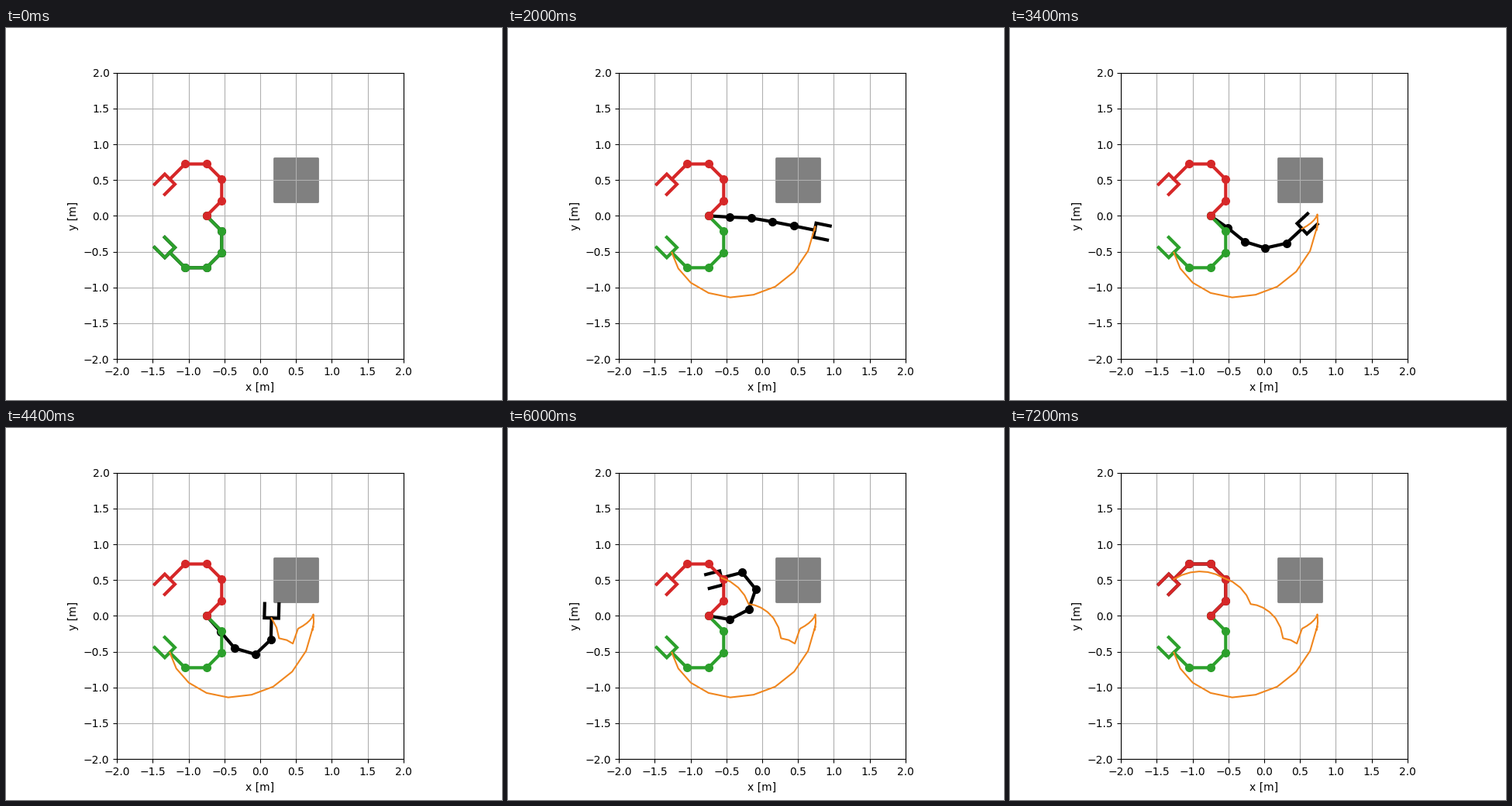
A matplotlib script for the animation above (7.4 s loop, 640 by 480 pixels).

```python
import numpy as np
import matplotlib.pyplot as plt
from matplotlib.animation import FuncAnimation

FRAMES, STEP_MS = 37, 200
BASE = np.array([-0.75, 0.0])
LINK, GRIP = 0.3, 0.1

# The arm uncurls from START and curls the other way to GOAL.
START = -45 * np.arange(1, 6)
GOAL = -START

# Link headings in degrees at the turning points of the motion, by step.
KEYS = {
    0: START,
    5: (-17, -36.5, -57, -84, -108),
    9: (-2, -1, -7, -9, -9.5),
    10: (-3.3, -2.5, -10, -11, -11.5),
    12: (-6, -5, 2, 4, 9),
    17: (-35, -39, -17, 12.5, 43),
    18: (-48, -50, -29, 10, 32),
    20: (-54, -57, -25, 5, 70),
    22: (-48.4, -49.4, -16.5, 43.5, 88.5),
    26: (-44, -29, 14, 80, 150),
    30: (-9.6, 27.5, 71, 129, 194.5),
    FRAMES - 1: GOAL,
}


def pose(step):
    """Link headings in radians, blended evenly between the key poses."""
    steps = list(KEYS)
    return np.radians([np.interp(step, steps, link) for link in zip(*KEYS.values())])


def joints(heading):
    """Points from the base to the hand."""
    links = LINK * np.column_stack([np.cos(heading), np.sin(heading)])
    return np.vstack([BASE, BASE + np.cumsum(links, axis=0)])


def gripper(hand, angle):
    along = np.array([np.cos(angle), np.sin(angle)])
    side = GRIP * np.array([-along[1], along[0]])
    left, right = hand + side, hand - side
    prong = 2 * GRIP * along
    return np.array([left + prong, left, right, right + prong])


class Arm:
    def __init__(self, ax, color):
        style = dict(color=color, lw=3, solid_capstyle="projecting")
        self.links, = ax.plot([], [], **style)
        self.dots, = ax.plot([], [], "o", color=color, ms=7)
        self.grip, = ax.plot([], [], solid_joinstyle="miter", **style)

    def set(self, heading):
        pts = joints(heading)
        self.links.set_data(*pts.T)
        self.dots.set_data(*pts[:-1].T)
        self.grip.set_data(*gripper(pts[-1], heading[-1]).T)


poses = [pose(i) for i in range(FRAMES)]
path = np.array([joints(p)[-1] for p in poses])

fig, ax = plt.subplots(figsize=(6.4, 4.8), dpi=100)
ticks = np.arange(-2, 2.1, 0.5)
ax.set(xlim=(-2, 2), ylim=(-2, 2), xticks=ticks, yticks=ticks,
       xlabel="x [m]", ylabel="y [m]", aspect="equal")
ax.grid(True)
ax.add_patch(plt.Rectangle((0.2, 0.2), 0.6, 0.6, color="gray", lw=2,
                           joinstyle="round"))

mover = Arm(ax, "black")
Arm(ax, "tab:green").set(poses[0])
Arm(ax, "tab:red").set(poses[-1])
trail, = ax.plot([], [], color="#f0861e", lw=1.5)


def update(i):
    mover.set(poses[i])
    trail.set_data(*path[:i + 1].T)
    return mover.links, mover.dots, mover.grip, trail


anim = FuncAnimation(fig, update, frames=FRAMES, interval=STEP_MS,
                     repeat=True, repeat_delay=0)
plt.show()
```
